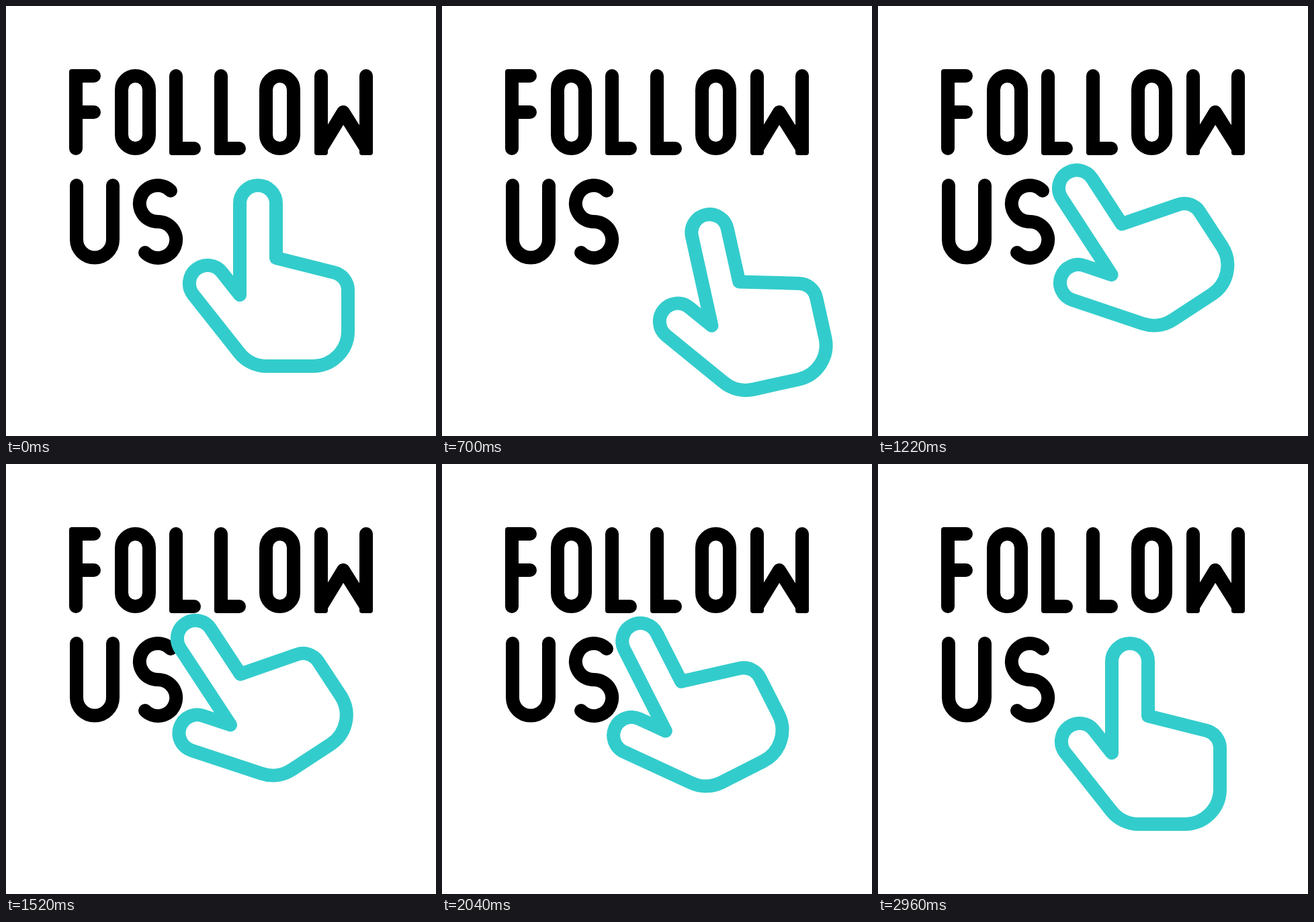
An HTML page that plays this animation: 640 by 640 pixels, repeating every 3.6 s.

```html
<!DOCTYPE html>
<html lang="en">
<head>
<meta charset="utf-8">
<title>Follow us</title>
<style>
html, body { margin: 0; width: 100%; height: 100%; overflow: hidden; background: #fff }
svg { display: block; width: 100%; height: 100% }
path { fill: none; stroke-width: 20; stroke-linecap: round; stroke-linejoin: round }
#text path { stroke: #000 }
#hand { stroke: #33cccc }
</style>
</head>
<body>
<svg viewBox="0 0 640 640" role="img" aria-label="Follow us">
  <g id="text">
    <path d="M131 104H104V212M104 158H131"/>
    <path d="M172 124.5a20.5 20.5 0 0 1 41 0V191.500a20.5 20.5 0 0 1-41 0Z"/>
    <path d="M253 104V212H280M320 104V212H347"/>
    <path d="M387 124.5a20.5 20.5 0 0 1 41 0V191.500a20.5 20.5 0 0 1-41 0Z"/>
    <path d="M469 104V212L502 158L536 212V104"/>
    <path d="M105 267V347.500a27 27 0 0 0 54 0V267"/>
    <path d="M245 275A27 27 0 1 0 226 321A27 27 0 1 1 207 367"/>
    <!-- tighter outer corners of F, L, L and W -->
    <rect x="94" y="94" width="20" height="20" rx="4"/>
    <rect x="243" y="202" width="20" height="20" rx="4"/>
    <rect x="310" y="202" width="20" height="20" rx="4"/>
    <rect x="459" y="202" width="20" height="20" rx="4"/>
    <rect x="526" y="202" width="20" height="20" rx="4"/>
  </g>
  <path id="hand" d="M348 430V294A27 27 0 0 1 402 294V375L488.700 396.800A27 27 0 0 1 509 423V484
    A52 52 0 0 1 457 536H388A52 52 0 0 1 347 516L278.700 429.700A27 27 0 0 1 321.300 396.300Z"/>
</svg>
<script>
const LOOP = 3600, STEP = 20;
const text = document.getElementById('text');
const hand = document.getElementById('hand');

// time, x shift, y shift, angle
const keys = [
  [0, 0, 0, 0],
  [380, 37.3, 36.9, 4.9],
  [540, 52, 49.5, -1],
  [800, 39, 24, -20],
  [980, 11.5, -7.5, -30],
  [1090, -2.5, -28.5, -32.5],
  [1360, -37, -60.5, -33.3],
  [1900, -37, -60.5, -33.3],
  [2040, -33, -49, -26.9],
  [2380, -11, -11.5, -5.4],
  [2560, 2, 3, 3],
  [2700, 3, 3.5, 3],
  [2820, -1, -3, -1],
  [2960, 0, 0, 0]
];

const secant = (i, c) => (keys[i + 1][c] - keys[i][c]) / (keys[i + 1][0] - keys[i][0]);

// Harmonic mean keeps the curve from overshooting its keys
function slope(i, c) {
  if (i === 0 || i === keys.length - 1) return 0;
  const a = secant(i - 1, c), b = secant(i, c);
  return a * b > 0 ? 2 * a * b / (a + b) : 0;
}

function pose(t, c) {
  const i = keys.findLastIndex(k => k[0] <= t);
  if (i === keys.length - 1) return 0;
  const p = keys[i], q = keys[i + 1], d = q[0] - p[0], u = (t - p[0]) / d;
  const blend = u * u * (3 - 2 * u);
  return p[c] + (q[c] - p[c]) * blend
    + d * u * (1 - u) * ((1 - u) * slope(i, c) - u * slope(i + 1, c));
}

function textScale(t) {
  const u = (t - 1540) / 440;
  return u > 0 && u < 1 ? 1 - 0.05 * Math.sin(Math.PI * u) ** 2 : 1;
}

function draw(now) {
  const t = Math.floor(now % LOOP / STEP) * STEP;
  hand.setAttribute('transform',
    `translate(${pose(t, 1)} ${pose(t, 2)}) rotate(${pose(t, 3)} 391 401)`);
  text.setAttribute('transform',
    `translate(320 239) scale(${textScale(t)}) translate(-320 -239)`);
}

let start;
function tick(now) {
  start ??= now;
  draw(now - start);
  requestAnimationFrame(tick);
}
draw(0);
requestAnimationFrame(tick);
</script>
</body>
</html>
```
